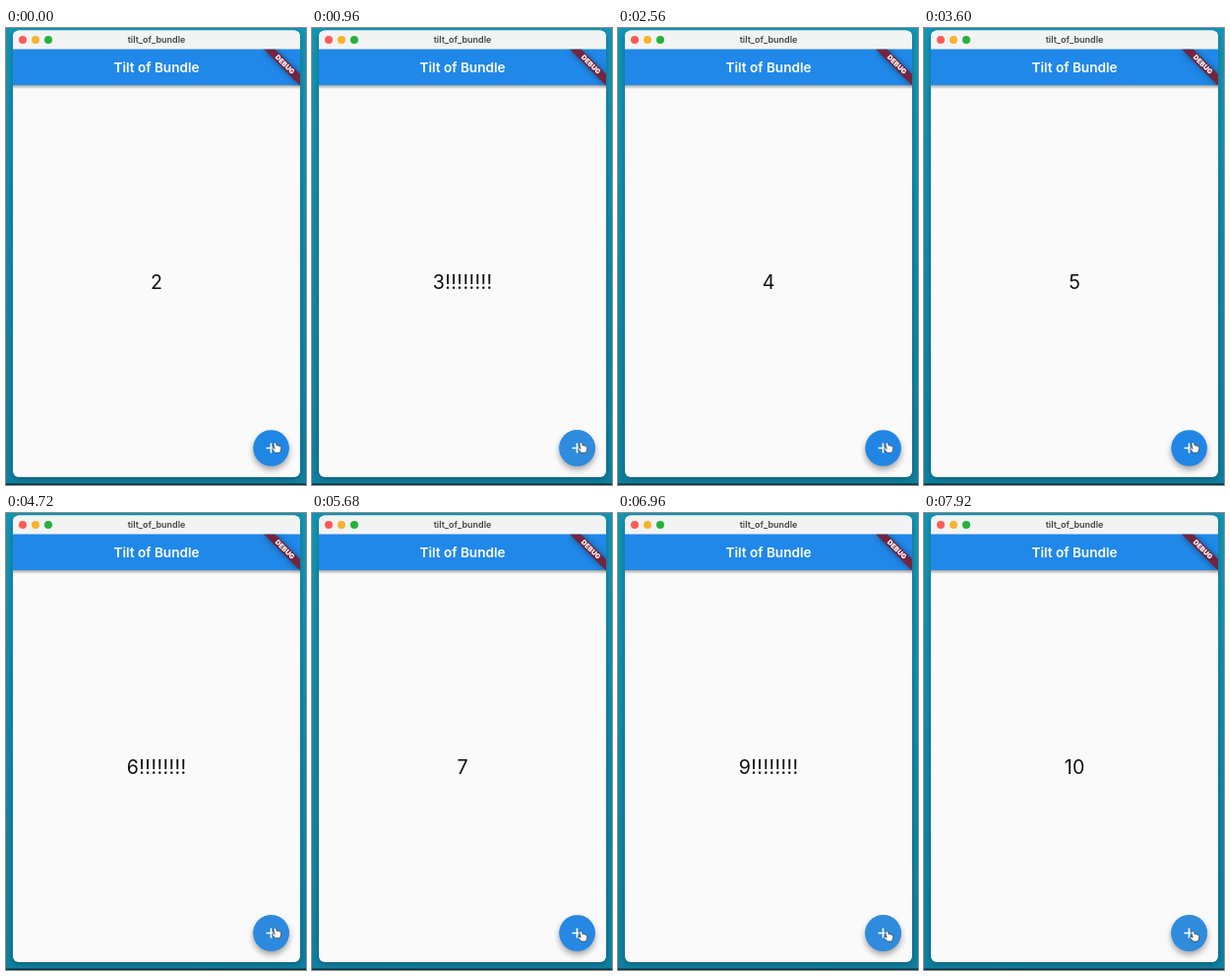
An HTML page that plays this animation: 305x464 px, repeating every 8000 ms.

```html
<!DOCTYPE html>
<html lang="en">
<head>
<meta charset="utf-8">
<title>Counter</title>
<style>
  html, body { margin: 0; width: 100%; height: 100%; overflow: hidden; background: #128bab; }
  svg { display: block; width: 305px; height: 464px; }
  text { font-family: Inter, Roboto, sans-serif; text-anchor: middle; }
  #count { font-size: 19.6px; letter-spacing: .4px; }
</style>
</head>
<body>
<svg viewBox="0 0 305 464">
  <defs>
    <linearGradient id="desk" x2="0" y2="1">
      <stop stop-color="#1594b4"/>
      <stop offset="1" stop-color="#107f9f"/>
    </linearGradient>
    <linearGradient id="fade" x2="0" y2="1">
      <stop stop-color="#000" stop-opacity=".35"/>
      <stop offset="1" stop-color="#000" stop-opacity="0"/>
    </linearGradient>
    <filter id="soft" x="-30%" y="-30%" width="160%" height="160%">
      <feGaussianBlur stdDeviation="3"/>
    </filter>
    <clipPath id="frame"><rect x="7" y="2.5" width="292" height="453.5" rx="6"/></clipPath>
    <clipPath id="page"><rect x="7" y="21.5" width="292" height="435"/></clipPath>
  </defs>

  <rect width="305" height="464" fill="url(#desk)"/>
  <rect y="462.5" width="305" height="1.5" fill="#10313f"/>
  <rect x="7" y="5" width="292" height="453" rx="6" opacity=".25" filter="url(#soft)"/>

  <g clip-path="url(#frame)">
    <rect x="7" y="2" width="292" height="454" fill="#fafafa"/>
    <rect x="7" y="2" width="292" height="20" fill="#f2f3f3"/>
    <rect x="7" y="58" width="292" height="4" fill="url(#fade)"/>
    <rect x="7" y="21.5" width="292" height="36.5" fill="#2088e8"/>
    <g clip-path="url(#page)">
      <path d="M262 22H274L299 47V59Z" filter="url(#soft)" opacity=".4"/>
      <path d="M262 21.5H273.5L299 47V58.5Z" fill="#74243f"/>
      <text transform="translate(283.6 36.9) rotate(45)" y="2.5" font-size="7" font-weight="900" fill="#fff">DEBUG</text>
    </g>
  </g>

  <circle cx="17" cy="12" r="4" fill="#fc5b57"/>
  <circle cx="30" cy="12" r="4" fill="#f6b32c"/>
  <circle cx="43" cy="12" r="4" fill="#27b13c"/>
  <text x="153" y="15" font-size="9" font-weight="600" fill="#454545">tilt_of_bundle</text>
  <text x="153" y="45" font-size="13.6" font-weight="600" fill="#fff">Tilt of Bundle</text>
  <text id="count" x="153.2" y="265" fill="#111"></text>

  <circle cx="269.6" cy="430" r="18.3" opacity=".36" filter="url(#soft)"/>
  <circle cx="269.6" cy="426.5" r="18.3" fill="#2086e6"/>
  <circle id="glow" cx="269.6" cy="426.5" r="18.3" fill="#2f8bdc"/>
  <path d="M264.5 426.5H274.5M269.5 421.5V431.5" stroke="#fff" stroke-width="1.6"/>
  <path id="hand" d="M-2.6-5.2Q-1.4-6.2-.6-4.8L.4-2.2Q1.4-3 2.2-2Q3.4-2.4 3.9-1.2Q5-1 4.8.4L4.2 3.2L3.2 5H-1.2L-4.4 1.4Q-4.6 0-3.2.2L-1.8 1L-3-3.6Z"
        fill="#fff" stroke="#333" stroke-width=".7" stroke-linejoin="round"/>
</svg>
<script>
const LOOP = 8000, RELEASE = 160;
const taps = [800, 1680, 2560, 3600, 4640, 5640, 6720, 7680];
const $ = id => document.getElementById(id);
const clamp = v => Math.max(0, Math.min(1, v));

// Press highlight: quick rise, short hold, slow fade
const press = age => age < 0 ? 0 : Math.min(clamp(age / 100), clamp((560 - age) / 300));

function draw(now) {
  const t = now % LOOP;
  const n = 2 + taps.filter(tap => t >= tap + RELEASE).length;
  const label = n + (n % 3 ? "" : "!".repeat(8));
  if ($("count").textContent !== label) $("count").textContent = label;
  $("glow").setAttribute("opacity", Math.max(...taps.map(tap => press(t - tap))));
  const y = 426.3 + 3.7 * clamp((t - 4640) / 880);
  $("hand").setAttribute("transform", `translate(275 ${y})`);
  requestAnimationFrame(draw);
}
requestAnimationFrame(draw);
</script>
</body>
</html>
```
